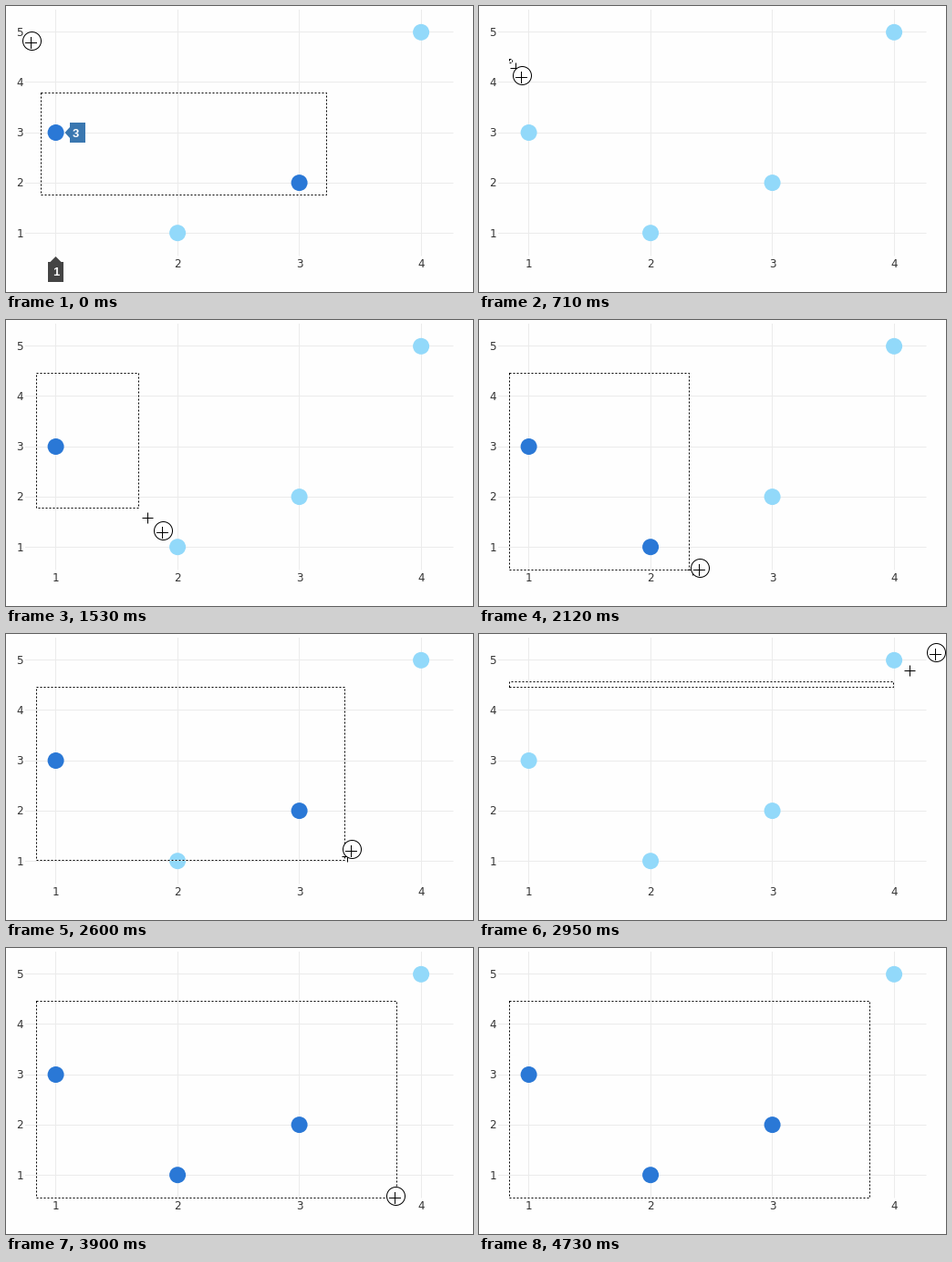
Write a matplotlib script that moves like this. It is 512x314 px and loops after 5440 ms.

```python
import math

import matplotlib.pyplot as plt
from matplotlib.animation import FuncAnimation
from matplotlib.patches import Circle, Polygon

W, H, DPI = 512, 314, 100
PX = 72 / DPI  # points per pixel
LOOP, TICK = 5440, 20

BACK, GRID, INK = "#fefefe", "#ebebeb", "#333333"
PICKED, FADED = "#2a78d6", "#92d9fa"

LEFT, RIGHT, TOP, BOTTOM = 21, 490.5, 4, 274.5
DATA = [(1, 3), (2, 1), (3, 2), (4, 5)]

# Cursor path: (time in ms, x, y), held until the next entry
PATH = [
    (0, 28, 38), (120, 29, 41), (240, 30, 45), (360, 32, 50),
    (470, 34, 56), (590, 37, 60),
    (710, 47, 76), (830, 74, 119), (940, 99, 151), (1060, 111, 164),
    (1180, 125, 180), (1300, 146, 204), (1420, 172, 231),
    (1540, 195, 248), (1650, 195, 248),
    (1890, 210, 262), (2010, 231, 272), (2120, 242, 272),
    (2240, 325, 246), (2360, 368, 246), (2480, 372, 246),
    (2600, 379, 236), (2720, 415, 150), (2830, 455, 50),
    (2950, 501, 20), (3070, 507, 16), (3190, 506, 16),
    (3430, 505, 16), (3550, 498, 70), (3670, 478, 160),
    (3780, 429, 272), (3900, 427, 272),
    (4380, 430, 276), (4500, 435, 287), (4620, 442, 306),
]
DRAG_FROM, DRAG_TO, GONE = 710, 3900, 4730
ANCHOR = (33.5, 58.5)
OLD_BOX = (38.5, 95.5, 351.5, 207.5)


def px(x):
    return 54.6 + 133.5 * (x - 1)


def py(y):
    return 249.2 - 55.1 * (y - 1)


def mid(v):
    """Centre of the pixel that holds v."""
    return math.floor(v) + 0.5


fig = plt.figure(figsize=(W / DPI, H / DPI), dpi=DPI, facecolor=BACK)
ax = fig.add_axes([0, 0, 1, 1])
ax.set(xlim=(0, W), ylim=(H, 0))
ax.axis("off")


def line(xs, ys, color, z, **kw):
    art, = ax.plot(xs, ys, color=color, lw=PX, zorder=z, snap=False,
                   solid_capstyle="butt", **kw)
    return art


def label(x, y, s, color, size, z, **kw):
    return ax.text(x, y, s, color=color, fontsize=size * PX, ha="center",
                   va="baseline", zorder=z, **kw)


def cross(z):
    return [line([], [], "black", z) for _ in range(2)]


def place_cross(arms, x, y, r=6.5):
    arms[0].set_data([x - r, x + r], [y, y])
    arms[1].set_data([x, x], [y - r, y + r])


def show(arts, on):
    for art in arts:
        art.set_visible(on)


for k in range(1, 5):
    line([mid(px(k))] * 2, [TOP, BOTTOM], GRID, 1)
    label(px(k), 287, str(k), INK, 12, 2, family="DejaVu Sans")
for k in range(1, 6):
    line([LEFT, RIGHT], [mid(py(k))] * 2, GRID, 1)
    label(15, py(k) + 4.3, str(k), INK, 12, 2, family="DejaVu Sans")

dots = [Circle((px(x), py(y)), 9, lw=0, zorder=3) for x, y in DATA]
for dot in dots:
    ax.add_patch(dot)

box_lines = [line([], [], "white", 4),
             line([], [], "black", 5, linestyle=(0, (2, 2)))]

tags = [
    Polygon([(64.5, 139), (70, 133), (70, 128), (87, 128), (87, 150),
             (70, 150), (70, 145)], fc="#3a77b0", lw=0, zorder=6),
    Polygon([(54.5, 275), (60.5, 281), (63, 281), (63, 303), (46, 303),
             (46, 281), (48.5, 281)], fc="#444444", lw=0, zorder=6),
]
for tag in tags:
    ax.add_patch(tag)
tags += [label(x, y, s, "white", 13, 7, family="Liberation Sans",
               weight="bold")
         for x, y, s in [(76.5, 143.6, "3"), (54.5, 296.2, "1")]]

native = cross(8)
ring = Circle((0, 0), 10, fc="white", ec="black", lw=PX, zorder=9)
ax.add_patch(ring)
plus = cross(10)


def hot(i):
    """Point the cursor aims at, on step i of the path."""
    _, x, y = PATH[i]
    return x - 0.5, y + 2.5


def update(n):
    t = n * TICK + TICK // 2
    step = max(i for i, p in enumerate(PATH) if p[0] <= t)

    x, y = hot(step)
    ring.center = (x + 1, y - 2)
    place_cross(plus, x, y)
    show([ring, *plus], t < GONE)

    # The selection trails the cursor by one step
    if t < DRAG_FROM:
        x0, y0, x1, y1 = OLD_BOX
    else:
        last = min(step, PATH.index((DRAG_TO, 427, 272)))
        bx, by = hot(last - 1)
        x0, y0 = ANCHOR
        x1, y1 = min(bx, RIGHT), min(by, BOTTOM)
        place_cross(native, mid(bx + 0.4 * (x - bx)),
                    mid(by + 0.4 * (y - by)), 6)
    show(native, DRAG_FROM <= t < PATH[-3][0])
    show(tags, t < DRAG_FROM)

    for art in box_lines:
        art.set_data([x0, x1, x1, x0, x0], [y0, y0, y1, y1, y0])
    for dot in dots:
        cx, cy = dot.center
        inside = x0 <= cx <= x1 and min(y0, y1) <= cy <= max(y0, y1)
        dot.set_facecolor(PICKED if inside else FADED)
    return [*dots, *box_lines, *tags, *native, ring, *plus]


anim = FuncAnimation(fig, update, frames=LOOP // TICK, interval=TICK,
                     init_func=lambda: update(0), repeat=True,
                     repeat_delay=0, blit=False)
plt.show()
```
